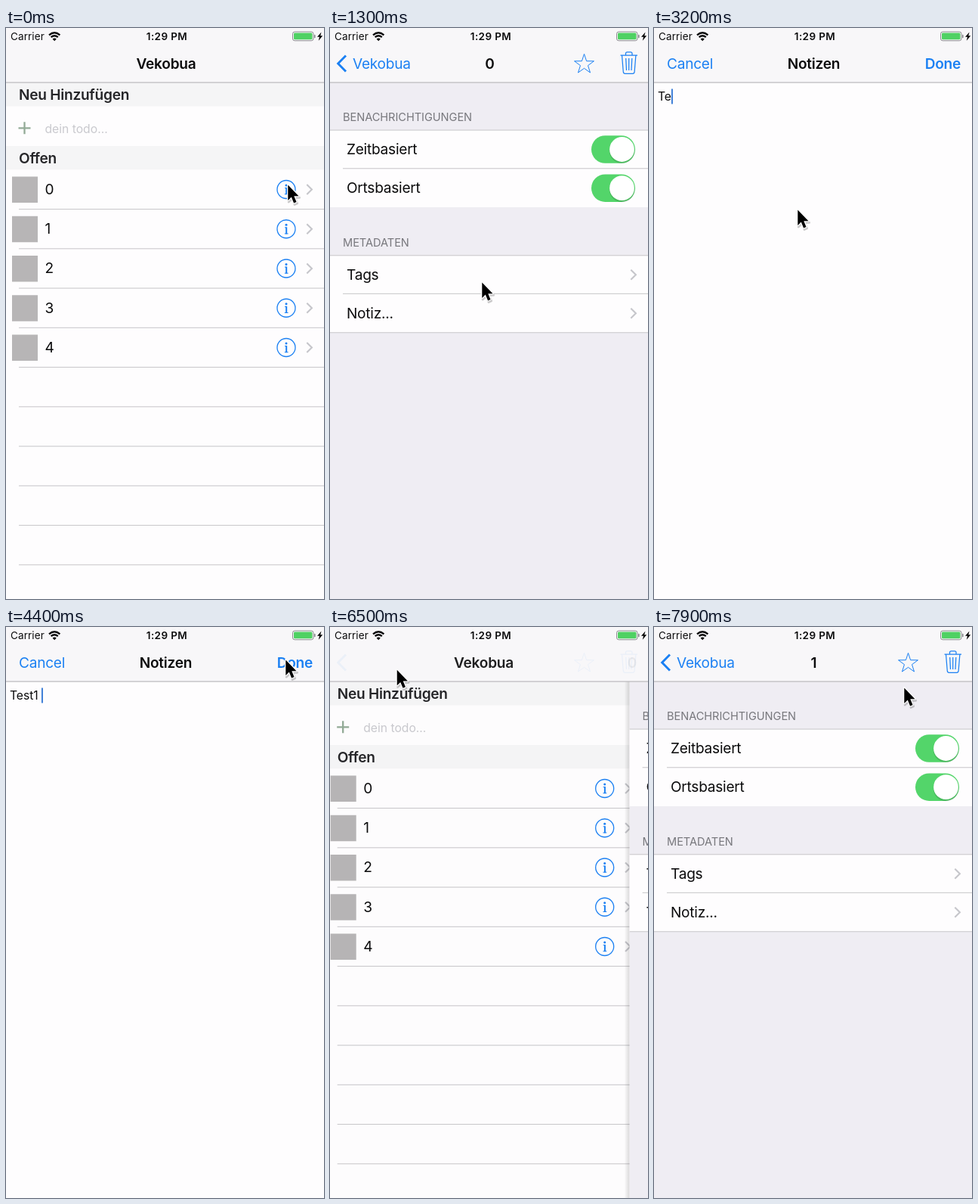
An HTML page that plays this animation: 421 by 755 pixels, repeating every 8 s.

```html
<!DOCTYPE html>
<html lang="de">
<head>
<meta charset="utf-8">
<title>Todo</title>
<style>
html, body { margin: 0; width: 100%; height: 100%; overflow: hidden; background: #fefdfe; }
svg { display: block; width: 100vw; height: 100vh; }
text { font: 19.08px Inter, "Liberation Sans", sans-serif; letter-spacing: -.25px; white-space: pre; fill: #0b0b0c; }
.bold { font-weight: 600; }
.head { font-weight: 600; fill: #252528; }
.caps { font-size: 14.6px; letter-spacing: -.05px; fill: #77777c; }
.note { font-size: 15.7px; letter-spacing: -.05px; }
.hint { font-size: 15.7px; letter-spacing: 0; fill: #c9c9ce; }
.status { font-size: 13.5px; letter-spacing: .1px; }
.clock { font-size: 13.5px; font-weight: 600; letter-spacing: .4px; }
.blue { fill: #1b80f3; }
.line { fill: none; stroke: #1b80f3; }
.mid { text-anchor: middle; }
.end { text-anchor: end; }
</style>
</head>
<body>
<svg id="stage" viewBox="0 0 421 755" preserveAspectRatio="none"></svg>
<script>
const W = 421, H = 755, LOOP = 8000, BAR = 72;
const APP = 'Vekobua';
const stage = document.getElementById('stage');

const text = (x, y, content, cls = '', id = '') =>
  `<text x="${x}" y="${y}" class="${cls}" id="${id}">${content}</text>`;
const rect = (x, y, w, h, fill, extra = '') =>
  `<rect x="${x}" y="${y}" width="${w}" height="${h}" fill="${fill}" ${extra}/>`;
const rule = (y, x = 0, color = '#cbcacd') => rect(x, y - .5, W - x, 1.1, color);
const chevron = y =>
  `<path d="M398.3 ${y - 6.5}l6.6 6.5l-6.6 6.5" fill="none" stroke="#c6c6cb" stroke-width="2.1"/>`;
const repeat = (n, make) => Array.from({ length: n }, (_, i) => make(i)).join('');

function todoRow(i) {
  const y = 213.5 + i * 52.25;
  return rect(8, y - 17, 34, 34.5, '#b7b5b6') + text(51.5, y + 6.3, i) + chevron(y) +
    `<circle cx="371" cy="${y}" r="12" class="line" stroke-width="1.3"/>
     <circle cx="371" cy="${y - 5.6}" r="1.5" class="blue"/>
     <path d="M371.2 ${y - 2.4}v9" class="line" stroke-width="2"/>
     <path d="M369 ${y - 1.9}h2.4M368.8 ${y + 6.2}h4.8" class="line" stroke-width="1"/>`;
}

const toggle = y =>
  rect(346, y - 18.3, 58, 36.6, '#53d56a', 'rx="18.3"') +
  `<circle cx="386.6" cy="${y + 1.8}" r="16.8" fill="#000" opacity=".13"/>
   <circle cx="386.5" cy="${y}" r="16.4" fill="#fff"/>`;

const starPoints = repeat(10, i => {
  const r = i % 2 ? 5.3 : 13.6, a = i * Math.PI / 5;
  return `${336.5 + r * Math.sin(a)},${48 - r * Math.cos(a)} `;
});

const listView = rect(0, BAR, W, H - BAR, '#fefdfe') +
  rect(0, BAR, W, 31.5, '#f5f5f6') + text(17, 95, 'Neu Hinzufügen', 'head') +
  '<path d="M16.5 132.3h16M24.5 124.3v16" stroke="#93ab97" stroke-width="2.3"/>' +
  text(51.5, 138.7, 'dein todo...', 'hint') +
  rect(0, 156, W, 31.3, '#f5f5f6') + text(17, 179, 'Offen', 'head') +
  repeat(5, todoRow) + repeat(10, i => rule(239.5 + i * 52.25, 17));

const detailView = rect(0, BAR, W, H - BAR, '#efedf3') +
  text(17, 123.4, 'BENACHRICHTIGUNGEN', 'caps') +
  rect(0, 135, W, 102, '#fefdfe') + rule(135) + rule(185.7, 17) +
  text(22, 167.2, 'Zeitbasiert') + text(22, 218.3, 'Ortsbasiert') +
  toggle(160.5) + toggle(211.7) +
  text(17, 289.3, 'METADATEN', 'caps') +
  rect(0, 301, W, 102, '#fefdfe') + rule(300.7) + rule(351.3, 17) + rule(402.7) +
  text(22, 332.8, 'Tags') + chevron(326.3) +
  text(22, 383.8, '', '', 'memo') + chevron(377.3);

const detailButtons =
  '<path d="M21 36.6L10.7 47L21 57.4" class="line" stroke-width="2.9"/>' +
  `<polygon points="${starPoints}" class="line" stroke-width="1"/>
   <path d="M384.5 36h22.5M391.5 36v-2.2q0-2 2-2h4.5q2 0 2 2v2.2M386.5 36l1.8 22q.2 2.3 2.5 2.3h9.8q2.3 0 2.5-2.3l1.8-22M391.7 40l.8 16M395.7 40v16M399.8 40l-.8 16"
     class="line" stroke-width="1.25"/>`;

const bar = rect(0, 0, W, BAR, '#f8f7f9') + rule(BAR, 0, '#b5b4b7');

const noteView = rect(0, 0, W, H, '#fefdfe') + bar +
  text(17, 53.8, 'Cancel', 'blue') + text(211.5, 53.8, 'Notizen', 'bold mid') +
  text(406, 53.8, 'Done', 'bold blue end') + text(5, 96.2, '', 'note', 'note') +
  rect(0, 80.5, 2, 20, '#3f7fd8', 'id="caret"');

const statusBar = text(6, 15.6, 'Carrier', 'status') + text(213, 15.6, '1:29 PM', 'clock mid') +
  `<g fill="none" stroke="#0b0b0c" stroke-width="2.3">
     <path d="M57 9.3q7.2-6.2 14.4 0M59.6 12.2q4.6-4 9.2 0"/></g>
   <path d="M61.6 14.4q2.6-2 5.2 0l-2.6 2.8z"/>` +
  rect(379.5, 5, 27.5, 11.8, 'none', 'rx="2.8" stroke="#8c8c90"') +
  rect(381, 6.5, 24.5, 8.8, '#4fd163', 'rx="1.4"') +
  rect(408, 8.8, 1.6, 4.4, '#8c8c90', 'rx=".8"') +
  '<path d="M417.5 5.5l-5.5 6.2h3l-1.2 5l5.4-6.5h-3z"/>';

const arrow = 'M.3 .5V20.9L4.8 16.6L8.1 24.4L11.5 22.9L8.3 15.2H14.5Z';

stage.innerHTML = `
  <defs><linearGradient id="shade">
    <stop offset="0" stop-color="#000" stop-opacity="0"/>
    <stop offset="1" stop-color="#000" stop-opacity=".14"/>
  </linearGradient></defs>
  <g id="list">${listView}</g>
  ${rect(0, BAR, W, H - BAR, '#000', 'id="dim"')}
  <g id="detail">${rect(-7, BAR, 7, H - BAR, 'url(#shade)')}${detailView}</g>
  ${bar}
  <g id="listTitle">${text(212, 53.8, APP, 'bold mid')}</g>
  <g id="backLabel">${text(30, 53.8, APP, 'blue')}</g>
  <g id="detailTitle">${text(211.5, 53.8, '0', 'bold mid', 'number')}</g>
  <g id="buttons">${detailButtons}</g>
  <g id="modal">${noteView}</g>
  ${statusBar}
  <g id="cursor">
    <path d="${arrow}" transform="translate(1 2)" opacity=".2" stroke="#000" stroke-width="3" stroke-linejoin="round"/>
    <path d="${arrow}" stroke="#fff" stroke-width="2.6" stroke-linejoin="round" paint-order="stroke"/>
  </g>`;

const part = Object.fromEntries([...stage.querySelectorAll('[id]')].filter(e => e.id).map(e => [e.id, e]));

const clamp = v => Math.min(1, Math.max(0, v));
const move = (el, x, y = 0) => el.setAttribute('transform', `translate(${x} ${y})`);
const fade = (el, v) => el.setAttribute('opacity', clamp(v));

// Critically damped spring, settled after half a second.
function spring(t, start) {
  const k = Math.max(0, t - start) * .01826;
  return k > 9.2 ? 1 : 1 - Math.exp(-k) * (1 + k);
}

const pointer = [
  [0, 373, 207], [600, 373, 207], [1300, 201, 336], [1650, 186, 378], [2150, 186, 378],
  [2650, 190, 240], [3700, 190, 240], [4300, 370, 43], [4850, 370, 43], [5950, 59, 34],
  [6350, 59, 34], [7150, 378, 276], [7350, 378, 276], [7850, 331, 80], [LOOP, 331, 80]
];

function pointerAt(t) {
  const i = pointer.findIndex(p => p[0] > t);
  const [t0, x0, y0] = pointer[i - 1], [t1, x1, y1] = pointer[i];
  const u = (t - t0) / (t1 - t0), e = u * u * (3 - 2 * u);
  return [x0 + (x1 - x0) * e, y0 + (y1 - y0) * e];
}

function drawNavigation(t) {
  const p = spring(t, 580) - spring(t, 6250) + spring(t, 7297);
  move(part.list, -.3 * W * p);
  fade(part.dim, .1 * p);
  move(part.detail, W * (1 - p));
  part.detail.style.display = p > 0 ? '' : 'none';
  move(part.listTitle, -147 * p);
  fade(part.listTitle, 1 - 1.5 * p);
  move(part.backLabel, 147 * (1 - p));
  fade(part.backLabel, 1.5 * p - .5);
  move(part.detailTitle, 200 * (1 - p));
  fade(part.detailTitle, p);
  fade(part.buttons, p);
  part.number.textContent = t < 7000 ? '0' : '1';
  part.memo.textContent = t > 4700 && t < 7000 ? 'Test1' : 'Notiz...';
}

function drawNote(t) {
  move(part.modal, 0, H * (1 - spring(t, 1842) + spring(t, 4700)));
  const typed = Math.floor(clamp((t - 2800) / 1200) * 6);
  part.note.textContent = t < 2800 ? 'Notiz...' : 'Test1 '.slice(0, typed);
  const typing = t >= 2800 && t < 4000;
  const lit = typing || t % 1000 < 600;
  part.caret.style.display = t > 2700 && t < 4800 && lit ? '' : 'none';
  part.caret.setAttribute('x', 5 + part.note.getComputedTextLength());
}

function draw(now) {
  const t = now % LOOP;
  drawNavigation(t);
  drawNote(t);
  move(part.cursor, ...pointerAt(t));
}

let origin;
function tick(now) {
  origin ??= now;
  draw(now - origin);
  requestAnimationFrame(tick);
}
draw(0);
requestAnimationFrame(tick);
</script>
</body>
</html>
```
